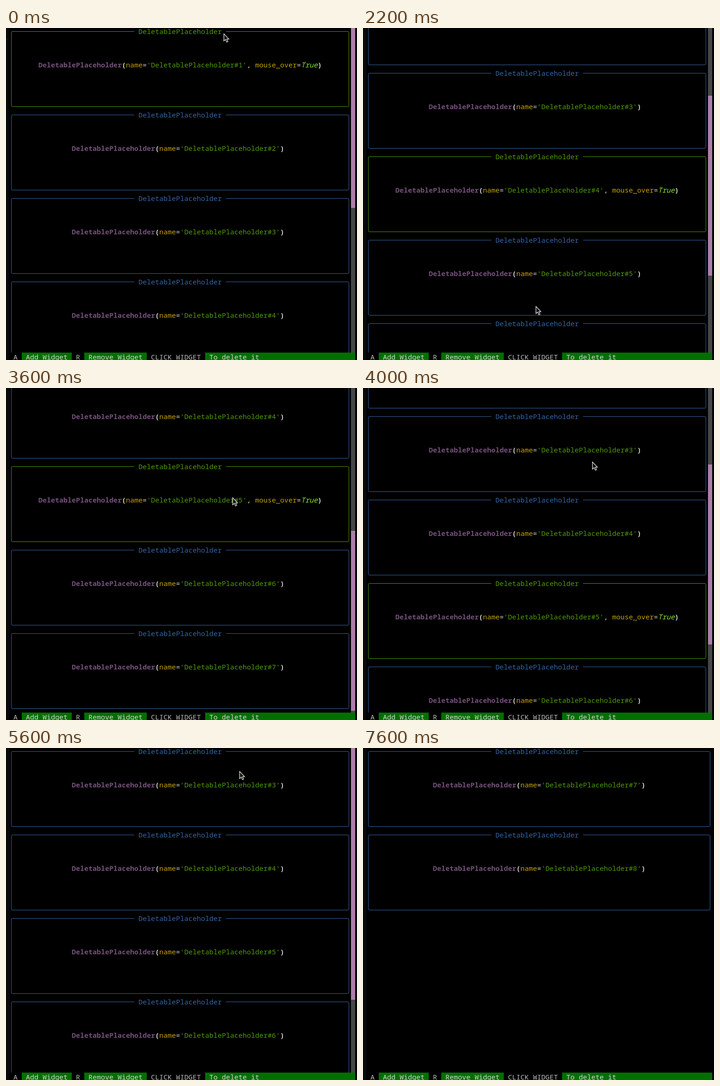
Recreate the animation shown at these times as an HTML page with a canvas. Size 758 by 716 pixels, loop 8000 ms.

```html
<!DOCTYPE html>
<html lang="en">
<head>
<meta charset="utf-8">
<title>Deletable widgets</title>
<style>
  html, body { margin: 0; width: 100%; height: 100%; overflow: hidden; background: #000; }
  canvas { display: block; }
</style>
</head>
<body>
<canvas id="stage" width="758" height="716"></canvas>
<script>
const ctx = document.getElementById('stage').getContext('2d');
const LOOP = 8000, STEP = 200;
const CELL = 9, ROW = 18, LEFT = 7, CARD_ROWS = 10, VIEW_ROWS = 39;
const VIEW_HEIGHT = 700, TRACK_HEIGHT = 697;
const BLUE = '#3465a4', GREEN = '#4e9a06', PURPLE = '#75507b', YELLOW = '#c4a000';
const WHITE = '#d3d7cf', LIME = '#8ae234', FOOTER = '#007000';
const TITLE = 'DeletablePlaceholder';

// Keyframes: [time, value, ...]
const scrollKeys = [[1400, 0], [1800, 108], [2200, 264], [2600, 480], [2800, 558],
                    [3600, 558], [4000, 300], [4400, 0]];
const cursorKeys = [[0, 470, 12], [200, 466, 30], [600, 425, 270], [1000, 382, 540], [1200, 373, 600],
                    [3000, 373, 600], [3200, 410, 490], [3600, 489, 236],
                    [4600, 505, 43], [4800, 504, 50]];
const removals = [5200, 5600, 6000, 6400, 6800, 7200];
const ADD_TIME = 7600, CURSOR_HIDE = 7400;

function sample(keys, t) {
  const next = keys.findIndex(k => k[0] > t);
  if (next === 0) return keys[0].slice(1);
  if (next < 0) return keys[keys.length - 1].slice(1);
  const a = keys[next - 1], b = keys[next];
  const p = (t - a[0]) / (b[0] - a[0]);
  return a.slice(1).map((v, i) => v + (b[i + 1] - v) * p);
}

function fill(color, x, y, w, h) {
  ctx.fillStyle = color;
  ctx.fillRect(x, y, w, h);
}

// Draws [text, color, style] spans one after another on the character grid.
function write(spans, x, centerY) {
  for (const [text, color, style = ''] of spans) {
    ctx.font = `${style} 15px "Noto Sans Mono", monospace`;
    ctx.fillStyle = color;
    ctx.fillText(text, x, centerY + 5);
    x += text.length * CELL;
  }
}

function drawCard(id, top, columns, hovered) {
  const color = hovered ? GREEN : BLUE;
  ctx.strokeStyle = color;
  ctx.lineWidth = 1;
  ctx.beginPath();
  ctx.roundRect(11.5, top + 7.5, (columns - 1) * CELL, (CARD_ROWS - 1) * ROW, 2.5);
  ctx.stroke();
  fill('#000', 277, top, 198, 16);
  write([[TITLE, color]], 286, top + 8);

  const spans = [[TITLE, PURPLE, 'bold'], ['(', WHITE, 'bold'], ['name', YELLOW], ['=', WHITE],
                 [`'${TITLE}#${id}'`, GREEN]];
  if (hovered) spans.push([', ', WHITE], ['mouse_over', YELLOW], ['=', WHITE], ['True', LIME, 'italic']);
  spans.push([')', WHITE, 'bold']);
  const length = spans.reduce((sum, [text]) => sum + text.length, 0);
  const indent = Math.floor((columns - length) / 2);
  write(spans, LEFT + indent * CELL, top + 80);
}

function drawScrollbar(scroll, totalRows) {
  const scale = TRACK_HEIGHT / (totalRows * ROW);
  fill('#464646', 745, 0, 9, VIEW_HEIGHT);
  fill('#ad7fa8', 745, Math.floor(scroll * scale), 9, Math.floor(VIEW_ROWS * ROW * scale));
}

function drawFooter() {
  fill('#000', LEFT, VIEW_HEIGHT, 751, 16);
  let x = LEFT;
  for (const [key, action] of [['A', 'Add Widget'], ['R', 'Remove Widget'], ['CLICK WIDGET', 'To delete it']]) {
    write([[` ${key} `, '#b8bbb5']], x, 710);
    x += (key.length + 2) * CELL;
    const width = (action.length + 2) * CELL;
    fill(FOOTER, x, VIEW_HEIGHT, key.length > 1 ? 754 - x : width, 16);
    write([[` ${action} `, WHITE]], x, 710);
    x += width;
  }
}

function drawCursor(x, y) {
  ctx.save();
  ctx.translate(x + 0.5, y + 0.5);
  const arrow = new Path2D('M0 0V15.5L3.6 12.3L6.2 18L8.8 16.8L6.3 11.3H10.8Z');
  ctx.fillStyle = '#111';
  ctx.fill(arrow);
  ctx.strokeStyle = '#eee';
  ctx.lineWidth = 1.2;
  ctx.stroke(arrow);
  ctx.restore();
}

function hoveredCard(t, first, cursorY) {
  const under = offset => 1 + Math.floor((cursorY + offset + 1) / (CARD_ROWS * ROW));
  if (t < 1400) return under(0);
  if (t < 3200) return 4;              // stays on the old card while scrolling
  if (t < 3600) return under(558);
  if (t < 4600) return 5;
  const moved = t >= 4800 && t < 7200 && (t < 5200 || t % 400 === 200);
  return moved ? first : 0;
}

function draw(t) {
  const first = 1 + removals.filter(time => time <= t).length;
  const last = t >= ADD_TIME ? 8 : 7;
  const [scroll] = sample(scrollKeys, t);
  const [cursorX, cursorY] = sample(cursorKeys, t).map(Math.round);
  const offset = Math.round(scroll / ROW) * ROW;
  const totalRows = (last - first + 1) * CARD_ROWS;
  const scrollable = totalRows > VIEW_ROWS;
  const hovered = hoveredCard(t, first, cursorY);

  fill('#000', 0, 0, 758, 716);
  fill('#08090d', 0, 0, t < 1600 ? 6 : 8, 716);
  if (t < 1600) fill('#1c1f25', 0, 23, 5, 1);

  ctx.save();
  ctx.beginPath();
  ctx.rect(0, 0, 758, VIEW_HEIGHT);
  ctx.clip();
  for (let id = first; id <= last; id++) {
    const top = (id - first) * CARD_ROWS * ROW - offset;
    drawCard(id, top, scrollable ? 82 : 83, id === hovered);
  }
  ctx.restore();

  if (scrollable) drawScrollbar(scroll, totalRows);
  drawFooter();
  if (t < CURSOR_HIDE) drawCursor(cursorX, cursorY);
}

function tick() {
  draw(Math.floor(performance.now() % LOOP / STEP) * STEP);
  requestAnimationFrame(tick);
}
tick();
</script>
</body>
</html>
```
